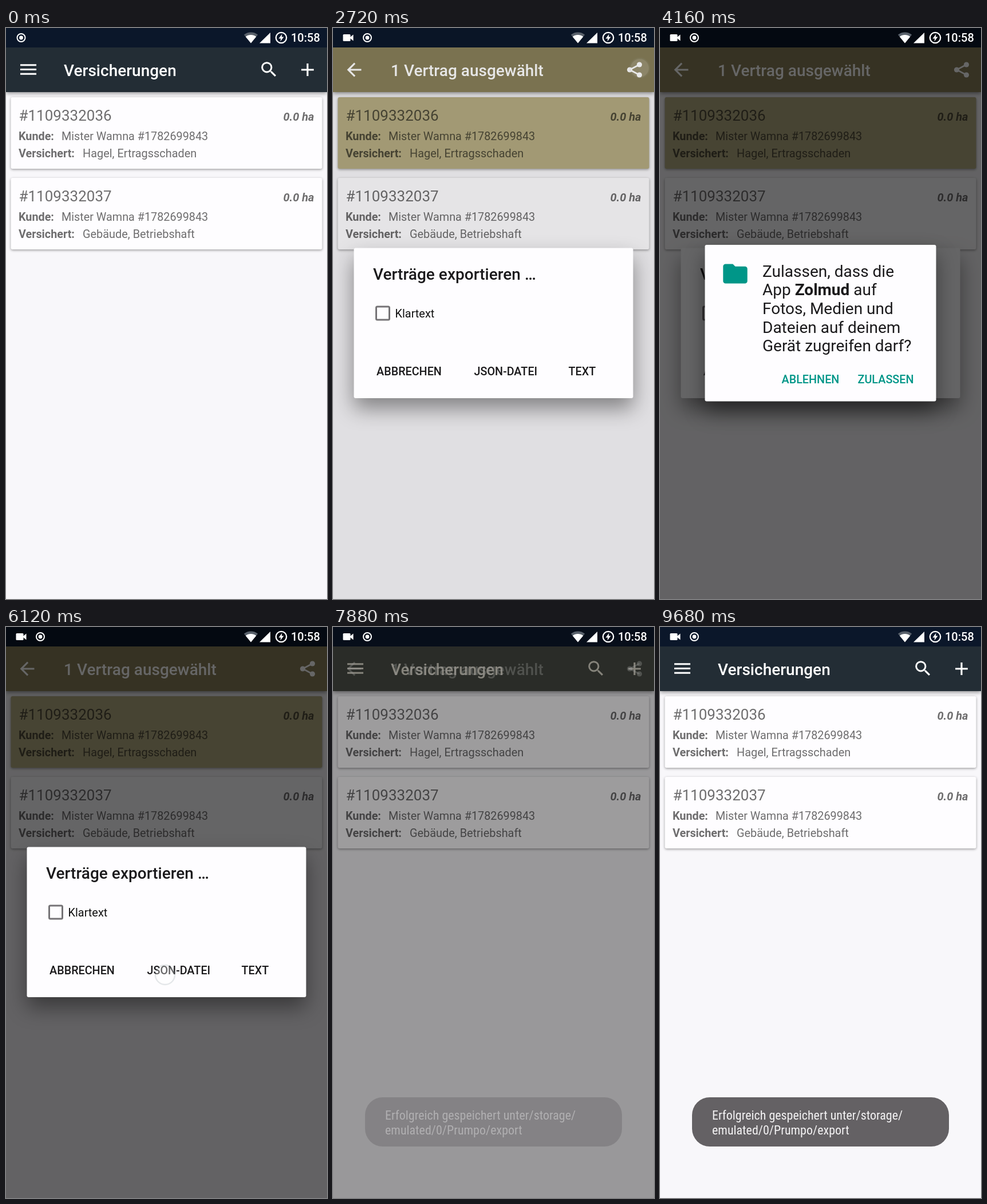
Recreate the animation shown at these times as an HTML page with a canvas. Size 561 by 998 pixels, loop 9.72 s.

```html
<!DOCTYPE html>
<html lang="de">
<head>
<meta charset="utf-8">
<title>Verträge exportieren</title>
<style>
html, body { margin: 0; width: 100%; height: 100%; overflow: hidden; background: #f8f7fa; }
canvas { display: block; width: 561px; height: 998px; }
</style>
</head>
<body>
<canvas id="stage" width="561" height="998"></canvas>
<script>
const ctx = document.getElementById('stage').getContext('2d');
const W = 561, H = 998, LOOP = 9720, STEP = 40, DP = 1.558, DIM = 0.6;
const INK = 'rgba(0,0,0,.57)', DARK = '#1b1a1c', TEAL = '#009688';
const FAMILY = 'Roboto, sans-serif';

const icons = {
  menu: 'M3 18h18v-2H3zM3 13h18v-2H3zM3 6v2h18V6z',
  search: 'M15.5 14h-.79l-.28-.27A6.47 6.47 0 0 0 16 9.5 6.5 6.5 0 1 0 9.5 16c1.61 0 3.09-.59 4.23-1.57l.27.28v.79l5 4.99L20.49 19zm-6 0a4.5 4.5 0 1 1 0-9 4.5 4.5 0 0 1 0 9z',
  add: 'M19 13h-6v6h-2v-6H5v-2h6V5h2v6h6z',
  back: 'M20 11H7.83l5.59-5.59L12 4l-8 8 8 8 1.41-1.41L7.83 13H20z',
  folder: 'M10 4H4a2 2 0 0 0-2 2v12a2 2 0 0 0 2 2h16a2 2 0 0 0 2-2V8a2 2 0 0 0-2-2h-8z'
};
for (const name in icons) icons[name] = new Path2D(icons[name]);

// Pointer marks: press time, place, hold and fade durations
const touches = [
  [440, 434, 188, 680, 320],
  [2360, 536, 70, 160, 280],
  [3720, 296, 606, 160, 280],
  [5880, 278, 608, 160, 280],
  [7400, 404, 647, 160, 280]
];

const ramp = (t, from, to) => Math.min(1, Math.max(0, (t - from) / (to - from)));
const pulse = (t, a, b, c, d) => ramp(t, a, b) * (1 - ramp(t, c, d));

function text(str, x, y, size, color, style = '400', align = 'left') {
  ctx.font = `${style} ${size}px ${FAMILY}`;
  ctx.fillStyle = color;
  ctx.textAlign = align;
  ctx.fillText(str, x, y);
  return ctx.measureText(str).width;
}

function rect(x, y, w, h, color) {
  ctx.fillStyle = color;
  ctx.fillRect(x, y, w, h);
}

function disc(x, y, r, color, lineWidth) {
  ctx.beginPath();
  ctx.arc(x, y, r, 0, Math.PI * 2);
  ctx.fillStyle = ctx.strokeStyle = color;
  ctx.lineWidth = lineWidth || 1;
  lineWidth ? ctx.stroke() : ctx.fill();
}

function shape(points, color) {
  ctx.beginPath();
  points.forEach(([x, y]) => ctx.lineTo(x, y));
  ctx.fillStyle = color;
  ctx.fill();
}

function panel(x, y, w, h, r, color, shadow, blur, drop) {
  ctx.save();
  ctx.shadowColor = `rgba(0,0,0,${shadow})`;
  ctx.shadowBlur = blur;
  ctx.shadowOffsetY = drop;
  ctx.beginPath();
  ctx.roundRect(x, y, w, h, r);
  ctx.fillStyle = color;
  ctx.fill();
  ctx.restore();
}

function icon(name, cx, cy, color, scale = DP) {
  ctx.save();
  ctx.translate(cx - 12 * scale, cy - 12 * scale);
  ctx.scale(scale, scale);
  ctx.fillStyle = color;
  ctx.fill(icons[name]);
  ctx.restore();
}

function faded(alpha, draw) {
  if (alpha <= 0) return;
  ctx.save();
  ctx.globalAlpha = alpha;
  draw();
  ctx.restore();
}

function dim(alpha) {
  if (alpha > 0) rect(0, 0, W, H, `rgba(0,0,0,${alpha})`);
}

function shareIcon() {
  const nodes = [[535.5, 64], [518.5, 73], [535.5, 82]];
  ctx.beginPath();
  nodes.forEach(([x, y]) => ctx.lineTo(x, y));
  ctx.strokeStyle = '#fff';
  ctx.lineWidth = 2.6;
  ctx.stroke();
  nodes.forEach(([x, y]) => disc(x, y, 4.6, '#fff'));
}

function card(y, id, cover, color) {
  panel(8.5, y, 544, 125, 3, color, .38, 4, 1.5);
  text(id, 22.5, y + 41, 26, INK);
  text('0.0 ha', 538.5, y + 41, 20, INK, 'italic 700', 'right');
  text('Kunde:', 22, y + 75, 19.8, INK, '700');
  text('Mister Wamna #1782699843', 97, y + 75, 19.8, INK);
  text('Versichert:', 22, y + 105, 19.8, INK, '700');
  text(cover, 134, y + 105, 19.9, INK);
}

function listScreen(t) {
  rect(0, 0, W, H, '#f8f7fa');
  const selected = t >= 920 && t < 7700;
  card(121, '#1109332036', 'Hagel, Ertragsschaden', selected ? '#b3aa80' : '#fefdff');
  card(262, '#1109332037', 'Gebäude, Betriebshaft', '#fefdff');

  panel(0, 34, W, 78, 0, '#232d35', .45, 7, 2);
  icon('menu', 39, 72.5, '#fff');
  text('Versicherungen', 101, 84, 28, '#fff', '500');
  icon('search', 459.5, 72.5, '#fff', 1.48);
  icon('add', 527, 73, '#fff');

  faded(pulse(t, 880, 960, 7800, 7920), () => {
    rect(0, 34, W, 78, '#877e59');
    icon('back', 37, 73, '#fff');
    text('1 Vertrag ausgewählt', 101, 84, 28, '#fff', '500');
    shareIcon();
  });
  rect(0, 0, W, 34, '#0b172a');
}

function checkbox(x, y) {
  ctx.beginPath();
  ctx.roundRect(x, y, 23, 23, 2);
  ctx.strokeStyle = '#757376';
  ctx.lineWidth = 3;
  ctx.stroke();
}

function exportDialog() {
  panel(36.5, 384.5, 488, 262.5, 3, '#fefdff', .42, 36, 18);
  text('Verträge exportieren …', 70, 440, 28, DARK, '500');
  checkbox(75.5, 487);
  text('Klartext', 108.5, 506, 19.9, '#111');
  text('ABBRECHEN', 76, 607, 19.8, DARK, '500');
  text('JSON-DATEI', 246.5, 607, 19.8, DARK, '500');
  text('TEXT', 411.5, 607, 19.8, DARK, '500');
}

// The repeated request grows by a checkbox row, half upwards and half downwards
function permissionDialog(grow) {
  panel(78.5, 379 - grow, 404, 273.5 + 2 * grow, 3, '#fefdff', .42, 36, 18);
  icon('folder', 131.5, 429.5 - grow, TEAL, 2.12);
  const lines = ['Zulassen, dass die', '', 'Fotos, Medien und', 'Dateien auf deinem', 'Gerät zugreifen darf?'];
  lines.forEach((line, i) => text(line, 179, 434.5 - grow + i * 32.7, 28, DARK));
  const y = 467.2 - grow;
  let x = 179 + text('App ', 179, y, 28, DARK);
  x += text('Zolmud', x, y, 28, DARK, '700');
  text(' auf', x, y, 28, DARK);
  if (grow) {
    checkbox(120, 577);
    text('Nicht mehr fragen', 179, 596, 21.8, INK);
  }
  text('ABLEHNEN', 212.5, 620.5 + grow, 19.8, TEAL, '500');
  text('ZULASSEN', 345.5, 620.5 + grow, 19.8, TEAL, '500');
}

function toast() {
  panel(56, 822, 449, 86, 31, '#646164', 0, 0, 0);
  const lines = ['Erfolgreich gespeichert unter/storage/', 'emulated/0/Prumpo/export'];
  const setFont = size => { ctx.font = `400 ${size}px "Roboto Condensed", ${FAMILY}`; };
  setFont(22);
  if (ctx.measureText(lines[0]).width > 350) setFont(20);
  ctx.fillStyle = '#f3f2f3';
  ctx.textAlign = 'left';
  lines.forEach((line, i) => ctx.fillText(line, 91, 860.5 + i * 26));
}

function wedge(radius, color) {
  ctx.beginPath();
  ctx.moveTo(428, 26.5);
  ctx.arc(428, 26.5, radius, -Math.PI / 2 - .69, -Math.PI / 2 + .69);
  ctx.fillStyle = color;
  ctx.fill();
}

function statusIcons(t) {
  const recording = t >= 240;
  if (recording) {
    panel(17.5, 11, 13, 12, 1.5, '#fff', 0, 0, 0);
    shape([[30, 16], [35.5, 11.5], [35.5, 22.5], [30, 18]], '#fff');
  }
  const x = recording ? 60 : 26.5;
  disc(x, 17, 7, '#fff', 2);
  disc(x, 17, 3.4, '#fff');
  wedge(19, '#59616b');
  wedge(14.5, '#fff');
  shape([[462, 8], [462, 26.5], [443, 26.5]], '#fff');
  disc(481, 17, 9.2, '#fff', 2.3);
  shape([[482.5, 10.5], [476.5, 18.5], [480.2, 18.5], [479.5, 23.5], [485.5, 15.6], [481.8, 15.6]], '#fff');
  text('10:58', 498, 24.3, 20, '#fff', '500');
}

function touchMark(t, [start, x, y, hold, fade]) {
  if (t < start) return;
  faded(1 - ramp(t, start + hold, start + hold + fade), () => {
    disc(x, y, 16, 'rgba(255,255,255,.48)');
    disc(x, y, 17, 'rgba(150,160,165,.34)', 2.4);
  });
}

function render(t) {
  const shade = DIM * pulse(t, 2660, 3020, 7780, 8060);
  const first = pulse(t, 3920, 4120, 5940, 6100);
  const second = pulse(t, 6140, 6320, 7480, 7660);
  const upper = shade * Math.max(first, second);

  listScreen(t);
  dim(1 - (1 - shade) / (1 - upper));
  faded(pulse(t, 2520, 2680, 7560, 7680), exportDialog);
  dim(upper);
  faded(first, () => permissionDialog(0));
  faded(second, () => permissionDialog(38));
  faded(ramp(t, 7800, 8000), toast);
  statusIcons(t);
  touches.forEach(touch => touchMark(t, touch));
}

const began = performance.now();
function tick() {
  const t = (performance.now() - began) % LOOP;
  render(Math.floor(t / STEP) * STEP);
  requestAnimationFrame(tick);
}
tick();
</script>
</body>
</html>
```
